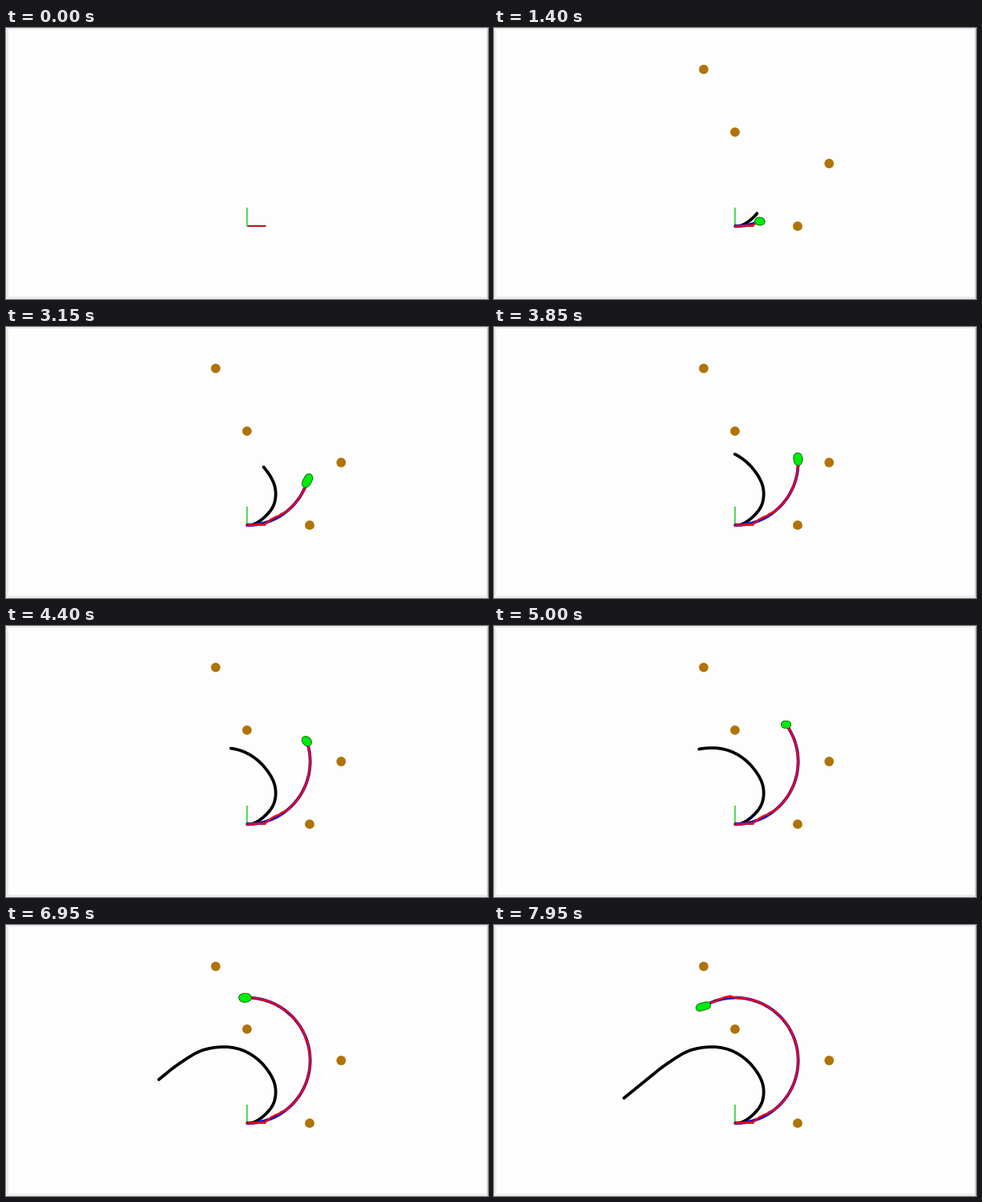
Recreate the animation shown at these times as an HTML page with a canvas. Size 600 px wide and 338 px high, loop 8 s.

```html
<!DOCTYPE html>
<html lang="en">
<head>
<meta charset="utf-8">
<title>Localization</title>
<style>
  html, body { margin: 0; width: 100%; height: 100%; overflow: hidden; background: #fefdfe; }
  canvas { display: block; width: 600px; height: 338px; }
</style>
</head>
<body>
<canvas id="stage" width="600" height="338"></canvas>
<script>
const ctx = document.getElementById('stage').getContext('2d');
const LOOP = 8000, STEP = 50, APPEAR = 350;
const CENTER = { x: 300.3, y: 169 }, RADIUS = 78.3, TURN_RATE = 0.5;
const landmarks = [[378, 247.2], [417.2, 169], [300, 129.8], [261, 51.6]];

// Dead reckoning passes these points at equal intervals; the outer two only steer the spline
const DRIFT_INTERVAL = 0.92;
const driftPoints = [
  [272, 215], [300.5, 247], [330, 228], [334.5, 198.5], [315, 169], [284.5, 153.3],
  [247.5, 155.3], [216.5, 172.3], [187.5, 195], [161.5, 216], [135, 236], [109, 256]
];

// Catmull-Rom spline
function driftAt(s) {
  const i = Math.floor(s / DRIFT_INTERVAL), t = s / DRIFT_INTERVAL - i;
  const [a, b, c, d] = driftPoints.slice(i, i + 4);
  return [0, 1].map(k => b[k] + t / 2 * (c[k] - a[k]
    + t * (2 * a[k] - 5 * b[k] + 4 * c[k] - d[k]
    + t * (3 * (b[k] - c[k]) + d[k] - a[k]))));
}

const bump = (x, center, width) => Math.exp(-(((x - center) / width) ** 2));

// The estimate drifts and snaps back, with larger misses near the start and the top
function estimateError(angle) {
  const drift = (angle / 0.19 % 1 - 0.5) * 1.4;
  return drift * Math.min(1, angle) + 1.7 * bump(angle, 0.27, 0.07)
    - 1.7 * bump(angle, 0.48, 0.14) + 2.4 * bump(angle, 3.27, 0.08);
}

function onCircle(angle, radius = RADIUS) {
  return [CENTER.x + radius * Math.sin(angle), CENTER.y + radius * Math.cos(angle)];
}

function curve(end, step, pointAt) {
  const points = [];
  for (let v = 0; v < end; v += step) points.push(pointAt(v));
  return [...points, pointAt(end)];
}

function line(points, color, width) {
  ctx.beginPath();
  points.forEach(p => ctx.lineTo(p[0], p[1]));
  ctx.strokeStyle = color;
  ctx.lineWidth = width;
  ctx.stroke();
}

function disc([x, y], radius, color) {
  ctx.beginPath();
  ctx.arc(x, y, radius, 0, 2 * Math.PI);
  ctx.fillStyle = color;
  ctx.fill();
}

function drawBackground() {
  ctx.fillStyle = '#ededed';
  ctx.fillRect(0, 0, 600, 338);
  ctx.fillStyle = '#fefdfe';
  ctx.fillRect(3, 2, 595, 333);
  ctx.fillStyle = '#c8c8c8';
  ctx.fillRect(599, 0, 1, 338);
  ctx.lineCap = 'butt';
  line([[300, 247], [323.5, 247]], '#a81a1a', 2);
  line([[300, 247.5], [300, 224]], '#50d85c', 2);
}

// Particles stretch along the direction of travel, and their spread swells and shrinks
function drawCloud(s, angle) {
  const grown = Math.min(1, s);
  const along = grown * (3 + 2 * Math.cos(2 * Math.PI * (s - 2.3) / 5));
  const across = grown * 1.5;
  const particles = [];
  for (let i = 0; i < 12; i++) {
    const u = along * Math.cos(i * 2.4), v = across * Math.sin(i * 2.4 + s);
    particles.push(onCircle(angle + u / RADIUS, RADIUS + v));
  }
  particles.forEach(p => disc(p, 4.6, '#0b7d12'));
  particles.forEach(p => disc(p, 3.5, '#00ea0c'));
}

// Speed ramps up during the first half second
function travelTime(t) {
  const s = (t - APPEAR) / 1000;
  return s < 0.5 ? s * s : s - 0.25;
}

function draw(t) {
  drawBackground();
  if (t < APPEAR) return;

  landmarks.forEach(p => disc(p, 5.9, '#b07305'));

  const s = travelTime(t), angle = s * TURN_RATE;
  ctx.lineCap = ctx.lineJoin = 'round';
  line(curve(s, 0.05, driftAt), '#000', 3.8);
  line(curve(angle, 0.01, a => onCircle(a)), '#1810c0', 3.8);
  line(curve(angle, 0.01, a => onCircle(a, RADIUS + estimateError(a))), '#ec0814', 2.4);
  drawCloud(s, angle);
}

function frame(now) {
  draw(Math.floor(now % LOOP / STEP) * STEP);
  requestAnimationFrame(frame);
}
draw(0);
requestAnimationFrame(frame);
</script>
</body>
</html>
```
